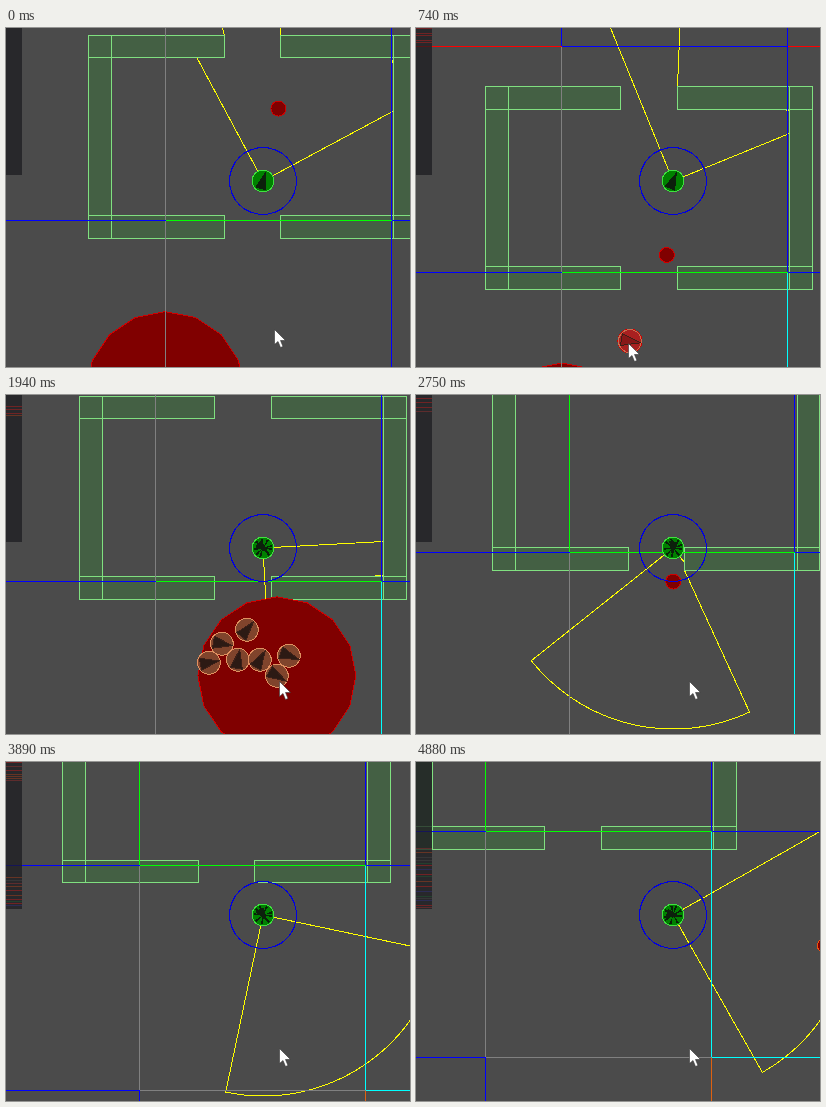
Recreate the animation shown at these times as an HTML page. Size 404x339 px, loop 4.95 s.

```html
<!DOCTYPE html>
<html lang="en">
<head>
<meta charset="utf-8">
<title>Vision cone</title>
<style>
html, body { margin: 0; width: 100%; height: 100%; overflow: hidden; background: #4b4b4b; }
svg { display: block; width: 100%; height: 100%; }
</style>
</head>
<body>
<svg id="stage" viewBox="0 0 404 339" shape-rendering="crispEdges"></svg>
<script>
const LOOP = 4950, STEPS = 74, STEP_MS = LOOP / STEPS;
const W = 404, H = 339, AX = 256.5, AY = 152.5;
const CELL = 225.6, RANGE = 181, RAY_STEP = 2.25, RAD = Math.PI / 180;
const stage = document.getElementById('stage');

// step, grid origin x, grid origin y, heading in degrees
const camera = [
  [0, 158.9, 192.1, -73.2], [11, 145.4, 243.52, -67.2], [29, 149.4, 186.25, 41.9],
  [41, 152.7, 157.1, 96.5], [52, 152.2, 120, 85.6], [65, 110.4, 82.6, 23.4], [73, 69.4, 69.1, 15.4]
];

// x, y, width, height relative to the grid origin
const THICK = 22.55, LONG = 135.5, TALL = 202.75;
const walls = [
  [-76.5, -185.3, LONG, THICK], [-76.5, -5.05, LONG, THICK],
  [115.15, -185.3, LONG, THICK], [115.15, -5.05, LONG, THICK],
  [-76.5, -185.3, THICK + .05, TALL], [228, -185.3, THICK + .1, TALL]
];

// first step, x, y
const waypoints = [[0, 113, -112], [9, 105, -17], [27, 104, 29], [46, 339, 114]];

// spawn step, x, y, facing
const foes = [
  [11, 66, 62, 10], [14, 53, 81, -10], [16, 82, 78, -80], [18, 91, 48, -50],
  [20, 104, 78, -60], [23, 133, 74, 20], [26, 121, 94, 30]
];
const FOES_END = 36, DRIFT = [2, 7];

// Grid edge colours: verticals by row, horizontals by column
const inks = { g: '#808080', b: '#00f', G: '#0f0', c: '#0ff', r: '#f00', o: '#e06010' };
const rows = ['rbr', 'bGb', 'bgc'];
const columns = [
  { from: 0, ink: ['gggg', 'bbbb'] },
  { from: 6, ink: ['bggg', 'bbcc'] },
  { from: 35, ink: ['GGgb', 'bbco'] }
];

// Stretches of the side panel that hold coloured lines
const panels = [
  { from: 0, bands: [] },
  { from: 6, bands: [[0, 18]] },
  { from: 20, bands: [[11, 20]] },
  { from: 35, bands: [[3, 18]] },
  { from: 47, bands: [[0, 18], [115, 146]] },
  { from: 59, bands: [[0, 20], [60, 146]] },
  { from: 69, bands: [[86, 146]] }
];

function sample(keys, s) {
  const i = Math.max(1, keys.findIndex(k => k[0] >= s));
  const a = keys[i - 1], b = keys[i];
  const u = Math.min(1, (s - a[0]) / (b[0] - a[0]));
  return a.slice(1).map((v, n) => v + (b[n + 1] - v) * u);
}

const lastFrom = (list, s, key) => list.filter(e => e[key] <= s).pop();
const polar = (x, y, r, deg) => [x + r * Math.cos(deg * RAD), y + r * Math.sin(deg * RAD)];

function random(seed) {
  return () => (seed = (seed * 16807) % 2147483647) / 2147483647;
}

function poly(points, fill, stroke) {
  const d = points.map(p => p.map(v => v.toFixed(1)).join()).join(' ');
  return `<polygon points="${d}" fill="${fill}" stroke="${stroke}"/>`;
}

function disc(x, y, r, sides, fill, stroke) {
  const points = Array.from({ length: sides }, (_, i) => polar(x, y, r, i * 360 / sides - 90));
  return poly(points, fill, stroke);
}

function pointer(x, y, r, deg, fill, stroke) {
  return poly([0, 145, 215].map(a => polar(x, y, r, deg + a)), fill, stroke);
}

function line(x1, y1, x2, y2, ink) {
  return `<path d="M${x1} ${y1}L${x2} ${y2}" stroke="${ink}"/>`;
}

// Snap a wall's edges to whole pixels
function place([x, y, w, h], gx, gy) {
  const left = Math.round(gx + x), top = Math.round(gy + y);
  return [left, top, Math.round(gx + x + w) - left, Math.round(gy + y + h) - top];
}

// Distance along a ray to the nearest wall, limited by the view range
function cast(deg, boxes) {
  const dx = Math.cos(deg * RAD), dy = Math.sin(deg * RAD);
  let best = RANGE;
  for (const [x, y, w, h] of boxes) {
    const tx = [(x - AX) / dx, (x + w - AX) / dx], ty = [(y - AY) / dy, (y + h - AY) / dy];
    const near = Math.max(Math.min(...tx), Math.min(...ty));
    const far = Math.min(Math.max(...tx), Math.max(...ty));
    if (near > 0 && near < far) best = Math.min(best, near);
  }
  return best;
}

// Evenly spaced rays, plus one onto each visible wall corner
function drawView(heading, boxes) {
  const rays = [];
  const add = off => {
    const deg = heading + off + 1e-5;
    rays.push({ off, deg, dist: cast(deg, boxes) });
  };
  for (let a = -45; a <= 45; a += RAY_STEP) add(a);
  for (const [x, y, w, h] of boxes) {
    for (const [cx, cy] of [[x, y], [x + w, y], [x, y + h], [x + w, y + h]]) {
      const a = Math.atan2(cy - AY, cx - AX) / RAD - heading;
      const off = ((a + 540) % 360 + 360) % 360 - 180;
      const reach = Math.hypot(cx - AX, cy - AY);
      if (Math.abs(off) > 44.9) continue;
      for (const o of [off - .01, off + .01]) {
        if (Math.abs(cast(heading + o, boxes) - reach) < 1) add(o);
      }
    }
  }
  rays.sort((a, b) => a.off - b.off);
  return poly([[AX, AY], ...rays.map(r => polar(AX, AY, r.dist, r.deg))], 'none', '#ff0');
}

function drawWalls(boxes) {
  const rects = style => boxes.map(([x, y, w, h]) =>
    `<rect x="${x}" y="${y}" width="${w}" height="${h}" ${style}/>`).join('');
  return rects('fill="#446044"') + rects('fill="none" stroke="#80e080"');
}

function drawGrid(gx, gy, ink) {
  const xs = [-1, ...[gx, gx + CELL].map(Math.round), W];
  const ys = [-1, ...[gy - CELL, gy, gy + CELL].map(Math.round), H];
  let out = '';
  ink.forEach((column, i) => [...column].forEach((c, j) => {
    const y1 = Math.max(-1, ys[j]), y2 = Math.min(H, ys[j + 1]);
    if (y2 > y1) out += line(xs[i + 1], y1, xs[i + 1], y2, inks[c]);
  }));
  rows.forEach((row, j) => [...row].forEach((c, i) => {
    out += line(xs[i], ys[j + 1], xs[i + 1], ys[j + 1], inks[c]);
  }));
  return out;
}

function foeAt([start, x, y], s) {
  const left = Math.max(0, 1 - (s - start) / 3);
  return [x + DRIFT[0] * left, y + DRIFT[1] * left];
}

function drawNoise(s, gx, gy) {
  if (s >= FOES_END) return '';
  const ring = (x, y, r) => disc(gx + x, gy + y, r, 16, '#800000', '#d00000');
  const foe = lastFrom(foes, s, 0);
  let out = s < 13 ? ring(0, 170, 79) : '';
  if (foe) out += ring(...foeAt(foe, s), Math.min(79, 12 + (s - foe[0]) * 23));
  return out;
}

function drawFoes(s, gx, gy) {
  if (s >= FOES_END) return '';
  return foes.filter(f => f[0] <= s).map(foe => {
    const [x, y] = foeAt(foe, s), fresh = s === foe[0];
    return disc(gx + x, gy + y, 11.5, 20, fresh ? '#a82020' : '#80442c', fresh ? '#c87050' : '#e09060') +
      pointer(gx + x, gy + y, 10.5, foe[3], fresh ? '#881818' : '#2c1a14', '#3c2018');
  }).join('');
}

function drawAgent(s, heading) {
  let out = disc(AX, AY, 33.5, 32, 'none', '#0000e0');
  out += disc(AX, AY, 11, 20, '#008000', '#40e040');
  if (s > 11) {
    const rnd = random(31 + s * 97);
    for (let i = 0; i < 9; i++) {
      const a = i * 40 + rnd() * 22;
      out += poly([[AX, AY], polar(AX, AY, 9.5, a), polar(AX, AY, 9.5, a + 14)], '#082008', 'none');
    }
  }
  return out + pointer(AX, AY, s > 11 ? 8 : 10, heading, '#0c200c', 'none');
}

function drawPanel({ from, bands }) {
  const rnd = random(from * 811 + 7);
  const tints = ['#a02020', '#903c20', '#803030', '#205030', '#303070', '#404040'];
  let out = '<rect x="-.5" y="-.5" width="16" height="147" fill="#1c1d20" fill-opacity=".75"/>';
  for (const [top, bottom] of bands) {
    for (let y = top; y <= bottom; y += 2 + Math.floor(rnd() * 4)) {
      const n = top < 50 ? 3 : tints.length;
      out += `<path d="M-.5 ${y}H15.5" stroke="${tints[Math.floor(rnd() * n)]}" stroke-opacity=".6"/>`;
    }
  }
  return out;
}

const cursorKeys = [
  [0, 268, 301],
  ...foes.map(foe => {
    const [gx, gy] = sample(camera, foe[0]), [x, y] = foeAt(foe, foe[0]);
    return [foe[0], gx + x - 1, gy + y + 2];
  }),
  [29, 273, 286], [STEPS, 273, 286]
];

function drawCursor(s) {
  const [x, y] = sample(cursorKeys, s).map(Math.round);
  return `<path transform="translate(${x} ${y})" d="M0 0V15L3.5 12L6 18L8.5 17L6 11H11Z" ` +
    'fill="#fff" stroke="#333" stroke-width=".6" shape-rendering="auto"/>';
}

function draw(s) {
  const [gx, gy, heading] = sample(camera, s);
  const boxes = walls.map(wall => place(wall, gx, gy));
  const [start, wx, wy] = lastFrom(waypoints, s, 0);
  stage.innerHTML = `<rect width="${W}" height="${H}" fill="#4b4b4b"/>` +
    '<g transform="translate(.5 .5)" fill="none">' +
    drawView(heading, boxes) +
    drawWalls(boxes) +
    disc(gx + wx, gy + wy, 7.5, 16, '#800000', start > 40 ? '#f05010' : '#d00000') +
    drawNoise(s, gx, gy) +
    drawGrid(gx, gy, lastFrom(columns, s, 'from').ink) +
    drawFoes(s, gx, gy) +
    drawAgent(s, heading) +
    drawPanel(lastFrom(panels, s, 'from')) +
    drawCursor(s) + '</g>';
}

let shown = -1;
const began = performance.now();
function tick() {
  const t = (performance.now() - began) % LOOP;
  const s = Math.min(STEPS - 1, Math.floor((t + 4) / STEP_MS));
  if (s !== shown) draw(shown = s);
  requestAnimationFrame(tick);
}
tick();
</script>
</body>
</html>
```
